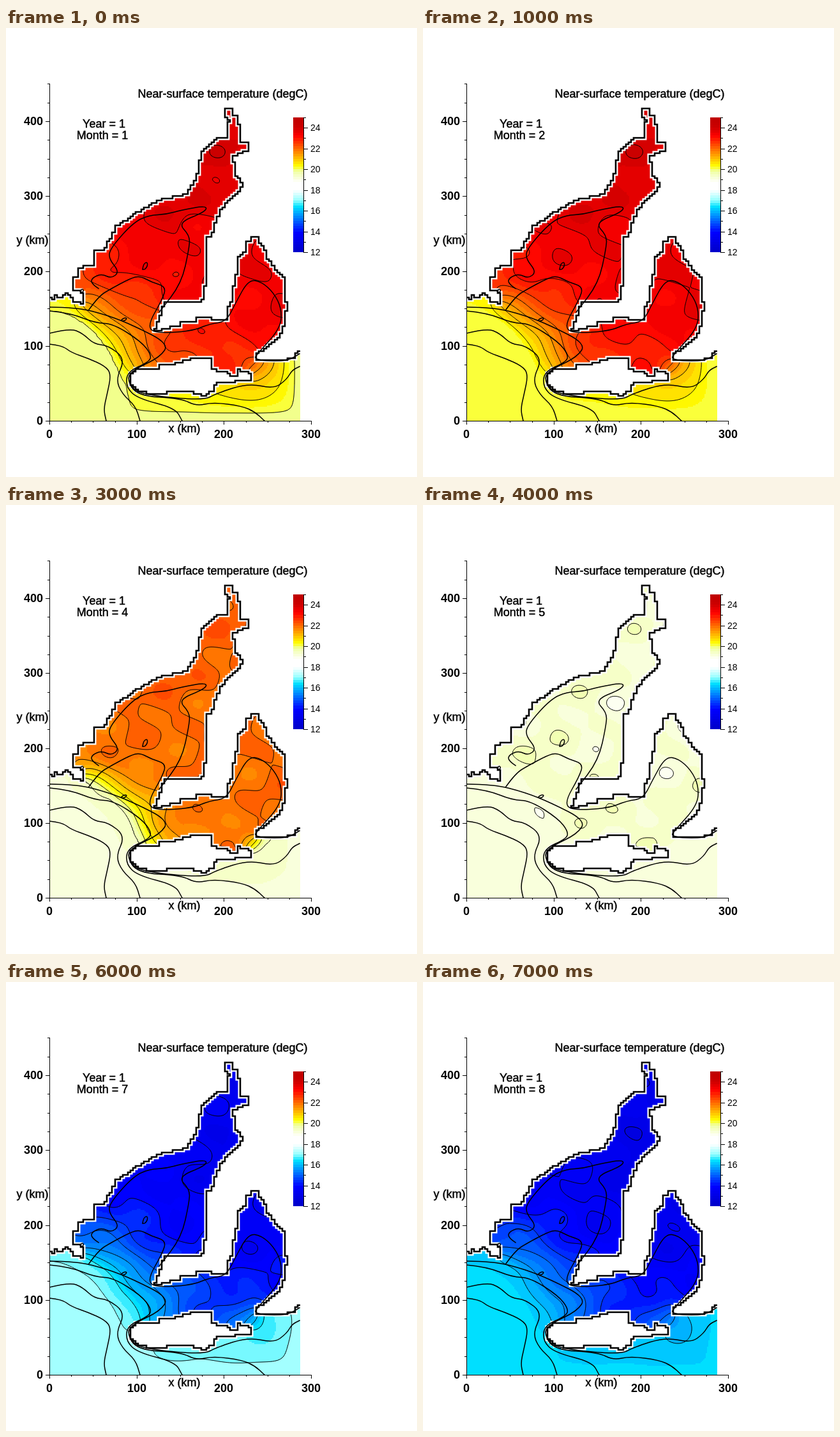
Recreate the animation shown at these times as an HTML page with a canvas. Size 644x703 px, loop 8000 ms.

```html
<!DOCTYPE html>
<html>
<head>
<meta charset="utf-8">
<style>
html, body { margin: 0; width: 644px; height: 703px; overflow: hidden; background: #fff; }
canvas { display: block; }
</style>
</head>
<body>
<canvas id="stage" width="644" height="703"></canvas>
<script>
const stage = document.getElementById('stage').getContext('2d');
const LEFT = 68, RIGHT = 460, TOP = 120, BOTTOM = 615;
const KM_X = 410 / 300, KM_Y = 469 / 400;
const parse = text => text.trim().split(/\s+/).map(p => p.split(',').map(Number));

// Coastline, clockwise from the western shore
const westShore = `M68,420 74,424 80,418 86,424 91,416 98,416 104,422 108,431 115,428 119,433
  121,420 118,412 104,412 104,390 114,388 114,375 137,372 137,349 157,345 157,333 166,330
  171,311 190,300 215,283 238,270 284,260 299,230 306,194 330,173 348,170 349,142 341,138
  341,125 354,125 356,135 364,140 368,179 380,180 380,192 355,201 358,215 360,230 369,238
  370,250 345,275 335,287 322,325 313,329 313,380 316,385 307,430`;
const eastShore = ` 248,430 243,447 233,474 245,473 245,470 270,468 275,461 295,460 297,455
  320,452 322,457 345,455 347,440 354,428 355,410 363,380 362,362 374,350 376,335
  382,333 384,326 393,326 398,338 406,345 410,360 424,382 437,392 437,425 440,430
  438,460 430,480 415,495 390,513 390,521 440,520 445,515 453,515 455,508 461,506
  461,616 67,616Z`;
const sea = new Path2D(westShore + eastShore);
const island = new Path2D(`M194,545 200,537 214,534 240,533 243,527 270,525 285,519 300,515 322,516
  322,535 345,537 350,543 362,543 362,535 380,538 385,547 380,553 330,554 325,567 310,578
  300,572 270,568 240,573 210,570 200,563 194,555Z`);

// Depth contours, the same in every month
const oceanDepths = [
  '68,495 88,497 102,508 128,517 155,529 165,542 158,575 153,597 157,615',
  '68,478 100,470 120,478 138,495 160,497 187,518 172,550 182,573 203,592 210,615',
  '68,443 100,446 140,462 168,463 212,491 228,512 224,523 190,538 188,562 206,580 265,595 276,615',
  '68,437 110,437 160,450 200,466 255,494 242,515 200,535 189,549 205,576 275,580 298,592 325,586 370,592 390,601 405,615',
  '192,548 195,566 230,576 310,583 330,572 380,556 420,565 440,550 448,536 460,530'
].map(parse);
const gulfDepths = [
  '130,441 145,420 165,408 195,392 210,388 228,398 251,405 245,425 222,465 232,478 290,475 320,463 345,460 360,430 380,394 400,397 420,415 432,440 430,470 396,508 387,520 440,522 460,510',
  '145,408 133,400 135,391 150,385 165,392 178,382 160,360 165,343 200,304 225,293 250,292 275,285 315,278 312,288 269,305 288,325 287,345 275,400 240,445',
  '214,378 215,370 221,366 222,372 218,378 214,378',
  '180,458 184,454 190,454 186,459 180,458',
  '116,412 119,408 122,411 119,415 116,412'
].map(parse);

// Each month: ocean, gulf entrance, middle and head, then the change towards the shore (degC)
const months = parse(`19.9,21.3,22.6,23.8,0.5  20,21.2,22.8,23.8,0.2  19.6,20.6,22.5,23.2,-0.2
  19.15,19.5,21.8,22.1,-2.6  19.1,19.1,19.4,19.2,-2.8  18.9,18.1,16.8,15.9,-3
  17.1,16.6,14.9,13.2,-1  16.3,15.9,14.6,13,-0.6`);

const scale = parse(`12,0,0,200 13.9,0,0,255 16.4,0,225,255 17,150,255,255 18,255,255,255
  18.7,255,255,255 19.8,240,255,165 20.3,255,255,0 23.2,255,0,0 24,205,0,0 25,190,0,0`);
const BAND = 0.25;

function bandColor(band) {
  const t = Math.max(12, Math.min(24.99, (band + 0.5) * BAND));
  const i = scale.findIndex(s => s[0] > t);
  const a = scale[i - 1], b = scale[i], f = (t - a[0]) / (b[0] - a[0]);
  return `rgb(${[1, 2, 3].map(k => Math.round(a[k] + (b[k] - a[k]) * f))})`;
}
const colors = Array.from({ length: 110 }, (_, band) => bandColor(band));

// The model grid has 3 km cells, so the shore runs in steps
const COLS = 96, ROWS = 142, CELL_W = 3 * KM_X, CELL_H = 3 * KM_Y;
const cellX = i => Math.round(LEFT + i * CELL_W), cellY = j => Math.round(BOTTOM - j * CELL_H);
const cells = Array.from({ length: COLS * ROWS }, (_, n) => {
  const i = n % COLS, j = Math.floor(n / COLS);
  const x = LEFT + (i + 0.5) * CELL_W, y = BOTTOM - (j + 0.5) * CELL_H;
  const wet = stage.isPointInPath(sea, x, y) && !stage.isPointInPath(island, x, y);
  const near = [];
  if (i > 0) near.push(n - 1);
  if (i < COLS - 1) near.push(n + 1);
  if (j > 0) near.push(n - COLS);
  if (j < ROWS - 1) near.push(n + COLS);
  return { i, j, x, y, wet, near };
});

const land = new Path2D(), shore = new Path2D();
cells.forEach(({ i, j, wet }, n) => {
  const x = cellX(i), y = cellY(j), x2 = cellX(i + 1), y2 = cellY(j + 1);
  if (!wet) land.rect(x, y2, x2 - x, y - y2);
  if (i < COLS - 1 && wet !== cells[n + 1].wet) { shore.moveTo(x2, y); shore.lineTo(x2, y2); }
  if (j < ROWS - 1 && wet !== cells[n + COLS].wet) { shore.moveTo(x, y2); shore.lineTo(x2, y2); }
});

// Spreads fixed values through the water; they fade to the goal over a reach given in cells
function diffuse(goal, reach, fixedValue) {
  const fixed = cells.map(fixedValue);
  const field = fixed.map(v => v ?? goal);
  const pull = 1 / reach ** 2;
  for (let sweep = 0; sweep < 200; sweep++)
    cells.forEach((cell, n) => {
      if (fixed[n] !== undefined) return;
      let sum = pull * goal, total = pull;
      for (const m of cell.near) {
        const weight = cells[m].wet ? 1 : 0.001;
        sum += weight * field[m];
        total += weight;
      }
      field[n] += 1.9 * (sum / total - field[n]);
    });
  return field;
}
const inOcean = ({ x, y }) =>
  Math.hypot((x - LEFT) / 120, (BOTTOM - y) / 170) < 1 || y > 604 || x > 454;
const enclosed = diffuse(1, 22, cell => inOcean(cell) ? 0 : undefined);
const shallow = diffuse(0, 3.4, cell => cell.wet ? undefined : 1);

function sample(field, x, y) {
  const u = Math.max(0, Math.min(COLS - 1.01, (x - LEFT) / CELL_W - 0.5));
  const v = Math.max(0, Math.min(ROWS - 1.01, (BOTTOM - y) / CELL_H - 0.5));
  const i = Math.floor(u), j = Math.floor(v), n = j * COLS + i, f = u - i, g = v - j;
  return (field[n] * (1 - f) + field[n + 1] * f) * (1 - g)
    + (field[n + COLS] * (1 - f) + field[n + COLS + 1] * f) * g;
}

function temperature([ocean, entrance, middle, head, shoreChange], x, y) {
  const c = sample(enclosed, x, y), s = sample(shallow, x, y);
  const ramp = (from, to) => Math.max(0, Math.min(1, (c - from) / (to - from)));
  const eddies = Math.sin(x / 23 + y / 31) + Math.sin(x / 13 - y / 17) + Math.sin(y / 11 + x / 37);
  return ocean + (entrance - ocean) * ramp(0, 0.35) + (middle - entrance) * ramp(0.35, 0.7)
    + (head - middle) * ramp(0.7, 1) + c * (shoreChange * s + 0.12 * (1 - s) * eddies);
}

// Adds the part of one contour level that crosses a triangle
function crossTriangle(ctx, level, corners) {
  const hits = [];
  corners.forEach((a, i) => {
    const b = corners[(i + 1) % 3];
    if ((a[2] < level) === (b[2] < level)) return;
    const f = (level - a[2]) / (b[2] - a[2]);
    hits.push([a[0] + (b[0] - a[0]) * f, a[1] + (b[1] - a[1]) * f]);
  });
  if (hits.length < 2) return;
  ctx.moveTo(...hits[0]);
  ctx.lineTo(...hits[1]);
}

function drawField(ctx, month) {
  const step = 2, cols = (RIGHT - LEFT) / step + 1, rows = Math.ceil((BOTTOM - TOP) / step) + 1;
  const grid = [];
  for (let j = 0; j < rows; j++)
    for (let i = 0; i < cols; i++) {
      const x = LEFT + i * step, y = TOP + j * step, t = temperature(month, x, y);
      grid.push([x, y, t]);
      ctx.fillStyle = colors[Math.floor(t / BAND)];
      ctx.fillRect(x - 1, y - 1, step, step);
    }
  ctx.beginPath();
  for (let j = 0; j < rows - 1; j++)
    for (let i = 0; i < cols - 1; i++) {
      const k = j * cols + i, a = grid[k], b = grid[k + 1], c = grid[k + cols], d = grid[k + cols + 1];
      const low = Math.min(a[2], b[2], c[2], d[2]), high = Math.max(a[2], b[2], c[2], d[2]);
      for (let level = Math.ceil(low * 2) / 2; level <= high; level += 0.5) {
        crossTriangle(ctx, level, [a, b, c]);
        crossTriangle(ctx, level, [b, c, d]);
      }
    }
  ctx.lineWidth = 1;
  ctx.strokeStyle = '#000';
  ctx.stroke();
}

function smoothLine(ctx, points) {
  ctx.moveTo(...points[0]);
  for (let i = 1; i < points.length - 1; i++) {
    const [x, y] = points[i], [nx, ny] = points[i + 1];
    ctx.quadraticCurveTo(x, y, (x + nx) / 2, (y + ny) / 2);
  }
  ctx.lineTo(...points[points.length - 1]);
}

function drawMap(ctx, month) {
  ctx.save();
  ctx.beginPath();
  ctx.rect(LEFT, TOP, RIGHT + 1 - LEFT, BOTTOM - TOP);
  ctx.clip();
  drawField(ctx, month);
  ctx.fillStyle = ctx.strokeStyle = '#fff';
  ctx.fill(land);
  ctx.lineCap = 'square';
  ctx.lineWidth = 7;
  ctx.stroke(shore);
  ctx.strokeStyle = '#000';
  ctx.lineWidth = 1.5;
  ctx.beginPath();
  [...oceanDepths, ...gulfDepths].forEach(points => smoothLine(ctx, points));
  ctx.stroke();
  ctx.lineWidth = 2.6;
  ctx.stroke(shore);
  ctx.restore();
}

function label(ctx, text, x, y, align = 'center', font = '18px', weight = 0) {
  ctx.font = font + ' "Liberation Sans", Arial, sans-serif';
  ctx.textAlign = align;
  ctx.fillText(text, x, y);
  if (!weight) return;
  ctx.lineWidth = weight;
  ctx.strokeText(text, x, y);
}
const title = (ctx, text, x, y) => label(ctx, text, x, y, 'center', '18px', 0.45);

function drawFrame(ctx, month) {
  ctx.fillStyle = ctx.strokeStyle = '#000';
  ctx.fillRect(68, 87, 1, 529);
  ctx.fillRect(68, 615, 411, 1);
  for (let km = 0; km <= 450; km += 25) {
    const major = km % 100 === 0, size = major ? 6 : 3;
    const x = Math.round(68 + km * KM_X), y = Math.round(615 - km * KM_Y);
    ctx.fillRect(68 - size, y, size, 1);
    if (major) label(ctx, km, 58, y + 6, 'right', 'bold 18px');
    if (km > 300) continue;
    ctx.fillRect(x, 615, 1, size);
    if (major) label(ctx, km, x, 642, 'center', 'bold 18px');
  }
  title(ctx, 'x (km)', 279.5, 633);
  title(ctx, 'y (km)', 41.5, 338);
  title(ctx, 'Near-surface temperature (degC)', 339.5, 109);
  title(ctx, 'Year = 1', 153.5, 156);
  title(ctx, 'Month = ' + month, 151, 174);

  const barY = t => Math.round(351 - (t - 12) * 211 / 13);
  for (let t = 12; t < 25; t += BAND) {
    ctx.fillStyle = colors[t / BAND];
    ctx.fillRect(450, barY(t + BAND), 17, barY(t) - barY(t + BAND));
  }
  ctx.fillStyle = '#000';
  ctx.fillRect(466, 140, 1, 212);
  for (let t = 12; t <= 25; t++) {
    ctx.fillRect(466, barY(t), t % 2 ? 4 : 7, 1);
    if (t % 2 === 0) label(ctx, t, 477, barY(t) + 5, 'left', '14px');
  }
}

const pictures = months.map((month, index) => {
  const canvas = document.createElement('canvas');
  canvas.width = 644;
  canvas.height = 703;
  const ctx = canvas.getContext('2d');
  ctx.fillStyle = '#fff';
  ctx.fillRect(0, 0, 644, 703);
  drawMap(ctx, month);
  drawFrame(ctx, index + 1);
  return canvas;
});

const start = performance.now();
function tick() {
  const elapsed = Math.max(0, performance.now() - start);
  stage.drawImage(pictures[Math.floor(elapsed / 1000) % pictures.length], 0, 0);
  requestAnimationFrame(tick);
}
tick();
</script>
</body>
</html>
```
